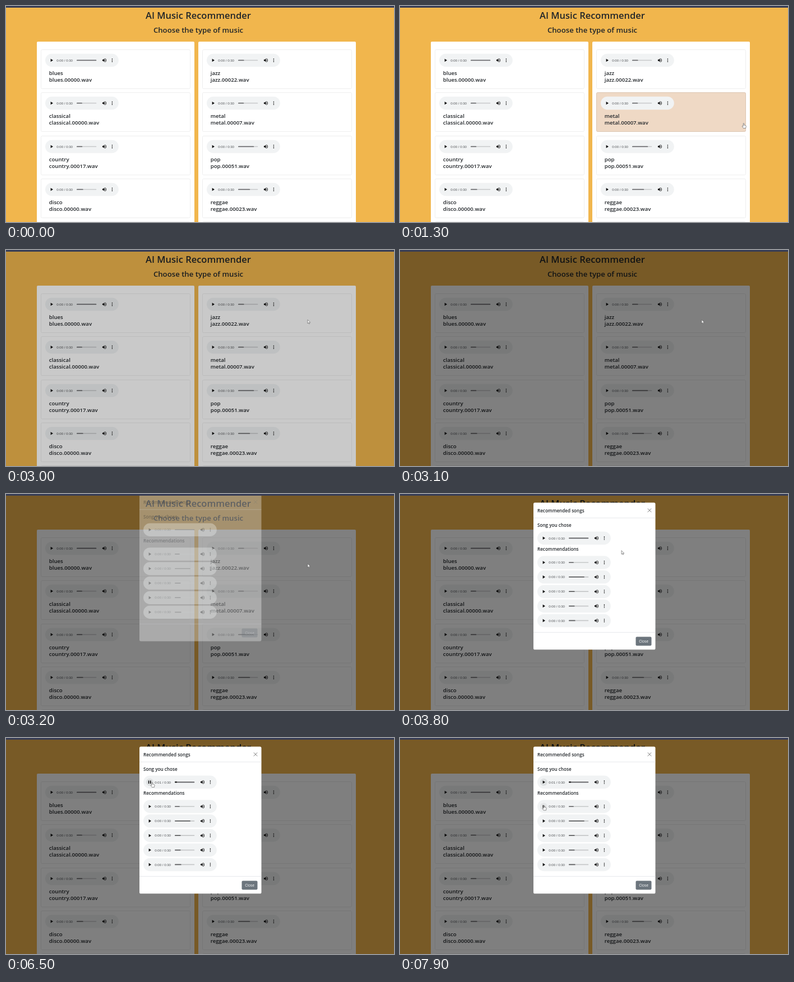
These frames come from a looping animation (692 by 388 pixels, 8 s). An HTML page with a canvas:

```html
<!DOCTYPE html>
<html lang="en">
<head>
<meta charset="utf-8">
<title>Music recommender</title>
<style>
html, body { margin: 0; width: 100%; height: 100%; overflow: hidden; background: #f1b64d; }
canvas { display: block; width: 692px; height: 388px; }
</style>
</head>
<body>
<canvas id="stage" width="692" height="388"></canvas>
<script>
const ctx = document.getElementById('stage').getContext('2d');
const LOOP = 8000, STEP = 100, ICON = 0.4;
const UI = '"Open Sans", "Noto Sans", sans-serif';
const INK = '#212529';

const icons = {
  play: new Path2D('M8 5v14l11-7z'),
  pause: new Path2D('M6 19h4V5H6zM14 5v14h4V5z'),
  volume: new Path2D('M3 9v6h4l5 5V4L7 9zM16.5 12c0-1.77-1-3.29-2.5-4v8c1.5-.7 2.5-2.2 2.5-4zM14 3.2v2.1c2.9.9 5 3.5 5 6.7s-2.1 5.8-5 6.7v2.1c4-.9 7-4.5 7-8.8s-3-7.9-7-8.8z'),
  more: new Path2D('M14 6a2 2 0 1 1-4 0a2 2 0 1 1 4 0zM14 12a2 2 0 1 1-4 0a2 2 0 1 1 4 0zM14 18a2 2 0 1 1-4 0a2 2 0 1 1 4 0z')
};
const arrow = new Path2D('M0 0V7.4L1.7 5.8L2.8 8.3L4 7.8L2.9 5.4H5.2z');
const hand = new Path2D('M-.9 .8Q0-.6 .9 .8V4L3.8 4.7Q4.9 5 4.7 6.4L4 10.2H-.6L-3 6.6Q-3.2 5.2-1.7 5.8L-.9 6.5z');

const columns = [
  { x: 55, items: [['blues', '00000', 1], ['classical', '00000', .28], ['country', '00017', .29], ['disco', '00000', .33]] },
  { x: 343, items: [['jazz', '00022', .3], ['metal', '00007', .29], ['pop', '00051', .8], ['reggae', '00023', .6]] }
];
const recommended = [.25, .79, .3, .3, .33];

const clamp = v => Math.min(1, Math.max(0, v));
const ramp = (t, a, b) => clamp((t - a) / (b - a));
const ease = p => (1 - Math.cos(Math.PI * p)) / 2;
const mix = (a, b, p) => a + (b - a) * p;

function box(x, y, w, h, r, fill, stroke) {
  ctx.beginPath();
  ctx.roundRect(x, y, w, h, r);
  if (fill) { ctx.fillStyle = fill; ctx.fill(); }
  if (stroke) { ctx.strokeStyle = stroke; ctx.lineWidth = 1; ctx.stroke(); }
}

function text(str, x, y, size, weight = 600, color = INK, align = 'left', family = UI) {
  ctx.font = `${weight} ${size}px ${family}`;
  ctx.fillStyle = color;
  ctx.textAlign = align;
  ctx.fillText(str, x, y);
}

function icon(path, cx, cy) {
  ctx.save();
  ctx.translate(cx, cy);
  ctx.scale(ICON, ICON);
  ctx.translate(-12, -12);
  ctx.fillStyle = '#101010';
  ctx.fill(path);
  ctx.restore();
}

function player(x, cy, level, { playing = false, time = '0:00', played = 0, focus = 0 } = {}) {
  box(x, cy - 11.75, 130.8, 23.5, 11.75, '#f1f3f4');
  if (focus) {
    ctx.beginPath();
    ctx.arc(x + 11.4, cy, 6.6, 0, 7);
    ctx.fillStyle = `rgba(60,64,67,${focus})`;
    ctx.fill();
  }
  icon(playing ? icons.pause : icons.play, x + 11.2, cy);
  text(`${time} / 0:30`, x + 20.2, cy + 2.2, 6.1, 400, '#505356', 'left', '"Liberation Sans", Arial, sans-serif');
  const left = x + 56, width = 35.3;
  box(left, cy - .85, width, 1.7, .85, '#c6c8c9');
  box(left, cy - .85, width * level, 1.7, .85, '#606163');
  if (played) box(left, cy - 1, played, 2, 1, '#111');
  icon(icons.volume, x + 105.5, cy);
  icon(icons.more, x + 119.4, cy);
}

function page(hover) {
  ctx.fillStyle = '#f1b64d';
  ctx.fillRect(0, 0, 692, 388);
  text('AI Music Recommender', 343, 23, 16.5, 600, INK, 'center');
  text('Choose the type of music', 343, 48.3, 13.2, 600, INK, 'center');
  for (const { x, items } of columns) {
    box(x, 64, 281, 340, 2, '#fff');
    for (let i = 0; i < 5; i++) {
      const y = 78.5 + Math.round(i * 77.35);
      box(x + 7.5, y, 266, 70, 2, '#fff', '#eee');
      if (!items[i]) continue;
      const [genre, id, level] = items[i];
      const glow = hover[genre] || 0;
      if (glow) {
        ctx.globalAlpha = glow;
        box(x + 7.5, y, 266, 70, 2, '#efd9c5', '#dcc5b0');
        ctx.globalAlpha = 1;
      }
      player(x + 15, y + 19, level);
      text(genre, x + 21.7, y + 45, 9.65);
      text(`${genre}.${id}.wav`, x + 21.7, y + 57.2, 9.65);
    }
  }
}

function modal(t) {
  const slide = 1 - Math.pow(1 - ramp(t, 3150, 3450), 2);
  ctx.save();
  ctx.globalAlpha = ramp(t, 3150, 3300);
  ctx.translate(0, -21.75 * (1 - slide));
  box(238, 15.5, 217.5, 264, 2.6, '#fff');
  ctx.fillStyle = '#dee2e6';
  ctx.fillRect(238, 42.6, 217.5, .8);
  ctx.fillRect(238, 248.3, 217.5, .8);
  text('Recommended songs', 245, 32.8, 8.15);
  ctx.beginPath();
  ctx.moveTo(441.8, 26.2); ctx.lineTo(448.2, 32.6);
  ctx.moveTo(448.2, 26.2); ctx.lineTo(441.8, 32.6);
  ctx.strokeStyle = '#777';
  ctx.lineWidth = 1;
  ctx.stroke();

  text('Song you chose', 245, 59, 8.15);
  player(245, 79.3, 1, {
    playing: t >= 5100 && t < 7000,
    time: t >= 6500 ? '0:01' : '0:00',
    played: t >= 6500 ? 4 : t >= 5900 ? 3 : t >= 5400 ? 2 : 0,
    focus: t >= 4300 ? .1 : 0
  });
  text('Recommendations', 245, 102.4, 8.15);
  recommended.forEach((level, i) =>
    player(245, 123 + i * 26.1, level, { focus: i === 0 && t >= 7900 ? .06 : 0 }));
  box(420.5, 256.5, 28, 16, 2, '#6c757d');
  text('Close', 434.5, 267, 6.6, 400, '#fff', 'center');
  ctx.restore();
}

function pointer(t) {
  if (t < 600) return;
  let x = 660.5, y = 264.5, shape = arrow;
  if (t < 3000) {
    const p = ease(ramp(t, 700, 2100));
    x = mix(x, 538.3, p);
    y = mix(y, 125.3, p);
    if (x < 617) shape = hand;
  } else if (t < 7500) {
    const p = ease(ramp(t, 3290, 4290));
    x = mix(538, 260.8, p);
    y = mix(125.3, 79.3, p);
    if (t >= 4300) shape = hand;
  } else {
    const p = ease(ramp(t, 7500, 7900));
    x = mix(260.8, 256.8, p);
    y = mix(79.3, 120.8, p);
    shape = p > .2 && p < .75 ? arrow : hand;
  }
  ctx.save();
  ctx.translate(x, y);
  ctx.scale(.9, .9);
  ctx.fillStyle = '#fff';
  ctx.fill(shape);
  ctx.strokeStyle = '#555';
  ctx.lineWidth = .7;
  ctx.lineJoin = 'round';
  ctx.stroke(shape);
  ctx.restore();
}

function draw(t) {
  const open = t >= 3000;
  page(open ? {} : {
    metal: ramp(t, 1050, 1300) * Math.pow(1 - ramp(t, 1500, 2200), 2),
    jazz: ramp(t, 1450, 1650)
  });
  if (open) {
    ctx.fillStyle = `rgba(0,0,0,${mix(.21, .5, ramp(t, 3000, 3100))})`;
    ctx.fillRect(0, 0, 692, 388);
    if (t > 3150) modal(t);
  }
  ctx.fillStyle = '#383d55';
  ctx.fillRect(0, 0, 692, 3);
  pointer(t);
}

function tick(now) {
  draw(Math.floor((now % LOOP) / STEP) * STEP);
  requestAnimationFrame(tick);
}
draw(0);
requestAnimationFrame(tick);
</script>
</body>
</html>
```
